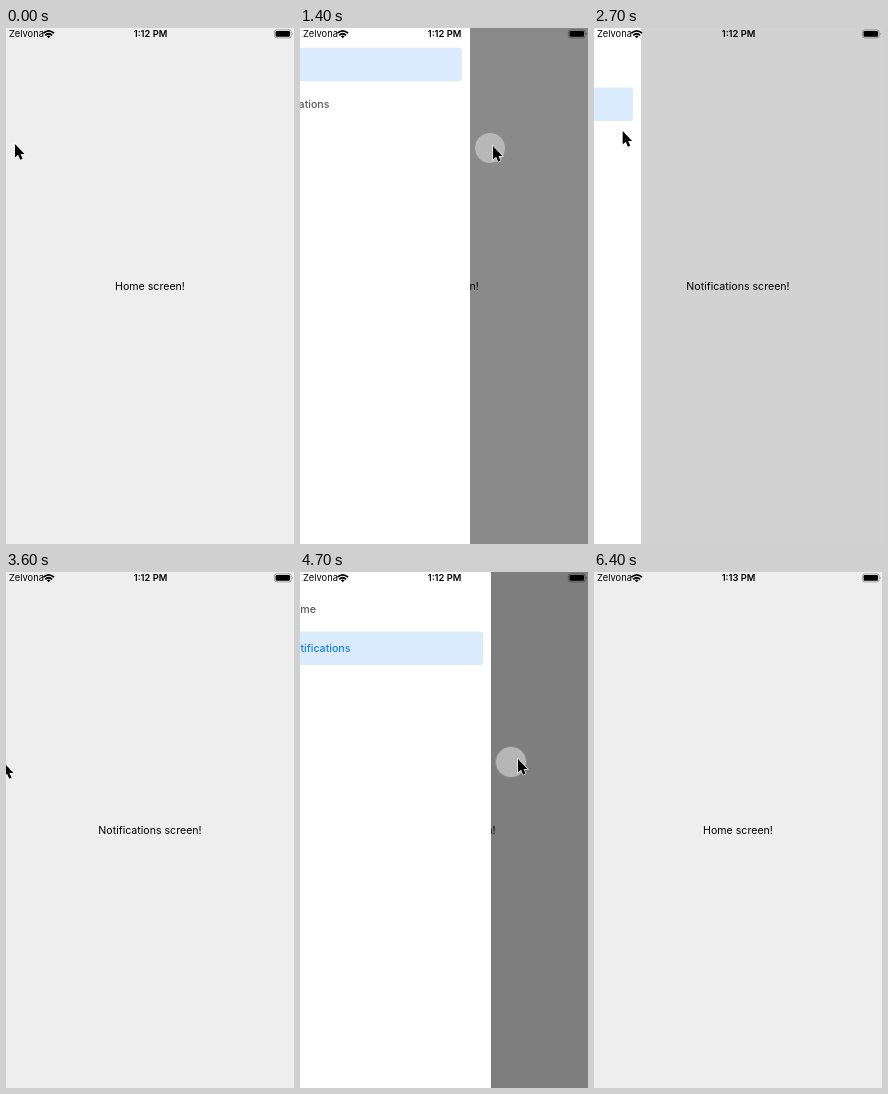
Write an HTML page that moves like this. It is 288 px wide and 516 px high and loops after 7200 ms.

```html
<!DOCTYPE html>
<html lang="en">
<head>
<meta charset="utf-8">
<title>Drawer navigation</title>
<style>
  html, body { margin: 0; width: 100%; height: 100%; overflow: hidden; background: #eee; }
  svg { display: block; width: 288px; height: 516px; }
  text { font: 10.6px Inter, "Liberation Sans", sans-serif; }
  .status { font-size: 9.3px; }
  .bold { font-weight: 600; }
  .label { font-weight: 500; }
  .mid { text-anchor: middle; }
</style>
</head>
<body>
<svg viewBox="0 0 288 516">
  <rect width="288" height="516" fill="#eee"/>
  <text id="page" class="mid" x="144" y="261.6"></text>
  <rect id="scrim" width="288" height="516"/>

  <g id="drawer">
    <rect width="217" height="516" fill="#fff"/>
    <rect id="mark" x="6" width="203" height="33.5" rx="3" fill="#dbebfe"/>
    <text class="label" x="12" y="40.6">Home</text>
    <text class="label" x="12" y="80.4">Notifications</text>
  </g>

  <text class="status" x="3" y="9.4">Zelvona</text>
  <g fill="none" stroke="#000" stroke-width="1.7">
    <path d="M37.4 5.2Q42.7 .5 48 5.2M39.3 7.3Q42.7 4.2 46.1 7.3"/>
    <path d="M40.8 8.2Q42.7 6.7 44.6 8.2L42.7 10.3Z" fill="#000" stroke="none"/>
  </g>
  <text id="clock" class="status bold mid" x="144.5" y="9.4"></text>
  <rect x="268.4" y="1.9" width="16.8" height="8" rx="2.3" fill="none" stroke="#000" stroke-opacity=".4" stroke-width=".8"/>
  <rect x="269.6" y="3" width="14.4" height="5.8" rx="1.3"/>
  <path d="M286.1 4.5q1.3 1.4 0 2.8z" fill-opacity=".5"/>

  <circle id="touch" r="15.6" fill="#bbb" fill-opacity=".92" stroke="#888" stroke-width=".9"/>
  <path id="cursor" d="M0 0V13.6L3.1 10.8 5.2 15.8 7.6 14.8 5.5 9.9H9.5Z" stroke="#fff" stroke-width="1.2" paint-order="stroke"/>
</svg>
<script>
const LOOP = 7200, STEP = 100, WIDTH = 217;
const $ = id => document.getElementById(id);
const labels = document.querySelectorAll('.label');
const clamp = (v, lo, hi) => Math.min(hi, Math.max(lo, v));

// Pointer tip: time, x, y
const path = [
  [0, 9, 116], [100, 9, 116], [200, 9, 117], [700, 9, 117],
  [800, 28, 118], [1200, 132, 118], [1400, 193, 118], [1500, 240, 118], [1600, 268, 117],
  [2100, 37, 71], [2500, 37, 71], [3100, 12, 167], [3600, -2, 191], [3700, -2, 191],
  [3800, 30, 191], [4400, 116, 189], [4600, 190, 188], [4800, 246, 186],
  [5200, 30, 34], [5500, 30, 34], [6100, 70, 125], [6300, 193, 220]
];
// Each visit to the drawer: drag, then a tap on an item
const visits = [
  { start: 800, end: 1600, tap: 2400, item: 1, dx: -3, dy: 2 },
  { start: 3800, end: 4800, tap: 5400, item: 0, dx: -7, dy: 3 }
];

function pointer(t) {
  const i = path.findIndex(k => k[0] > t);
  if (i < 0) return path.at(-1).slice(1);
  const [a, b] = [path[i - 1], path[i]];
  const f = (t - a[0]) / (b[0] - a[0]);
  return [1, 2].map(n => a[n] + (b[n] - a[n]) * f);
}

// Critically damped spring back to the closed position
function closing(ms) {
  const s = 0.013 * Math.max(0, ms - 78);
  return ms >= 800 ? 0 : WIDTH * (1 + s) * Math.exp(-s);
}

function pressFade(ms) {
  if (ms < 0) return 1;
  return ms < 100 ? 0.85 : clamp(0.25 + (ms - 100) / 270, 0, 1);
}

function draw(t) {
  const [x, y] = pointer(t);
  const visit = visits.findLast(v => t >= v.start);
  const dragging = visit && t <= visit.end;
  const active = t >= 2500 && t < 5500 ? 1 : 0;

  let edge = 0;
  if (visit) {
    edge = dragging ? clamp(x + visit.dx - 20, 0, WIDTH) : closing(t - visit.tap);
  }

  $('page').textContent = ['Home screen!', 'Notifications screen!'][active];
  $('clock').textContent = t < 5700 ? '1:12 PM' : '1:13 PM';
  $('scrim').setAttribute('opacity', 0.54 * edge / WIDTH);
  $('drawer').setAttribute('transform', `translate(${edge - WIDTH})`);
  $('mark').setAttribute('y', active ? 59.6 : 19.8);
  labels.forEach((label, i) => {
    label.setAttribute('fill', i === active ? '#1a7ff5' : '#58585a');
    label.setAttribute('opacity', visit && visit.item === i ? pressFade(t - visit.tap) : 1);
  });

  $('touch').style.display = dragging ? '' : 'none';
  if (dragging) $('touch').setAttribute('transform', `translate(${x + visit.dx} ${y + visit.dy})`);
  $('cursor').style.display = t < 6400 ? '' : 'none';
  $('cursor').setAttribute('transform', `translate(${x} ${y})`);
}

function tick() {
  const t = performance.now() % LOOP;
  draw(Math.floor(t / STEP) * STEP);
  requestAnimationFrame(tick);
}
tick();
</script>
</body>
</html>
```
